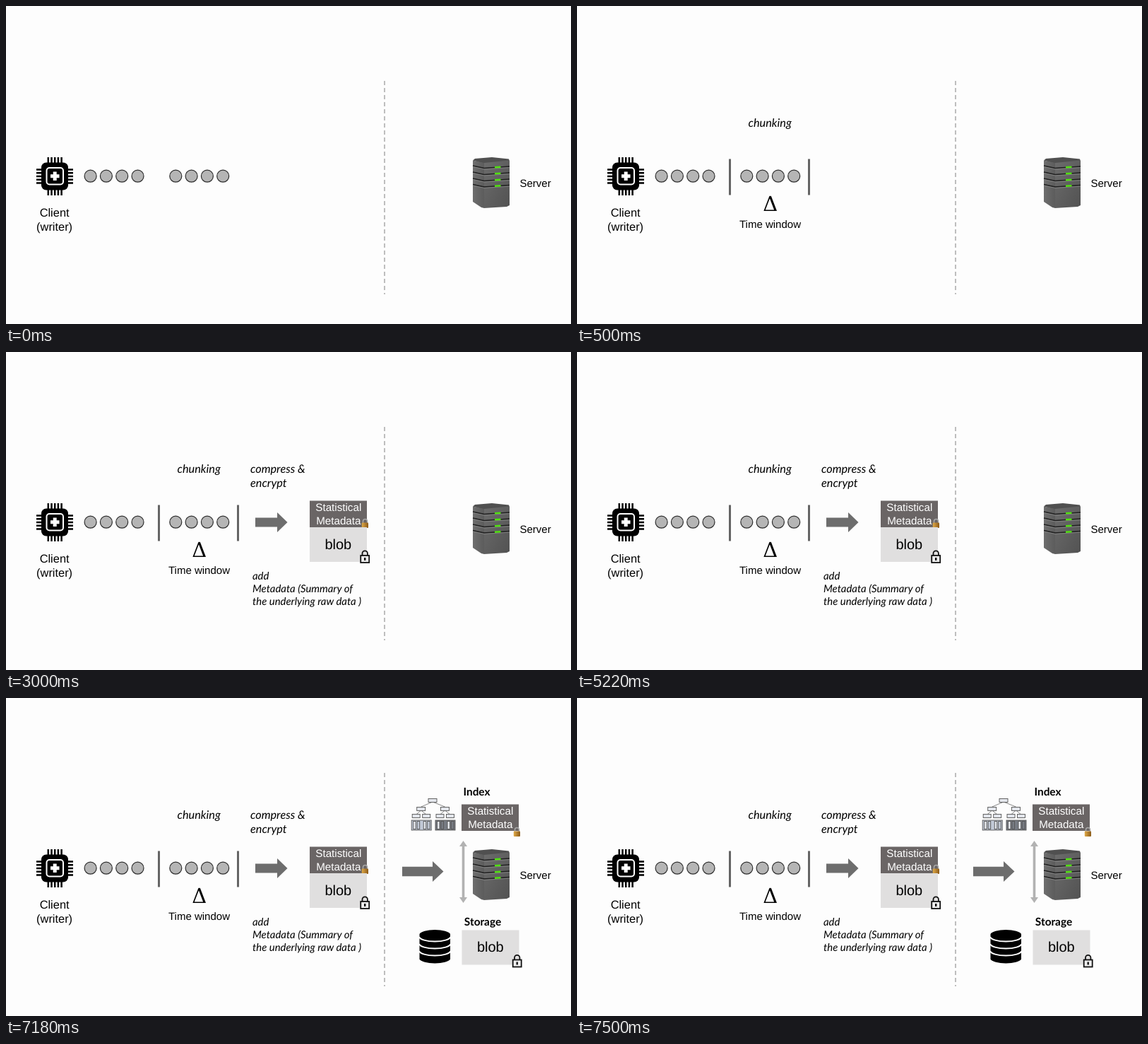
These frames come from a looping animation (800x450 px, 8000 ms). An HTML page:

```html
<!DOCTYPE html>
<html lang="en">
<head>
<meta charset="utf-8">
<title>Chunked upload pipeline</title>
<style>
  html, body { margin: 0; width: 100%; height: 100%; overflow: hidden; background: #fdfdfd; }
  svg { display: block; width: 100%; height: 100%; }
  text { font-family: "Liberation Sans", Arial, sans-serif; font-size: 15px; text-rendering: geometricPrecision; }
  .mid { text-anchor: middle; }
  .client { font-size: 16.4px; }
  .note { font: italic 16.3px Lato, sans-serif; }
  .small { font-size: 14.9px; }
  .head { font: bold 15.4px Lato, sans-serif; }
  .delta { font: 29px "DejaVu Serif", serif; }
  .blob { font-size: 20px; }
  .meta { font-size: 15.2px; fill: #fff; }
</style>
</head>
<body>
<svg viewBox="0 0 800 450">
  <defs>
    <linearGradient id="front" x1="0" y1="0" x2="1" y2="1">
      <stop offset="0" stop-color="#6c6c6c"/><stop offset="1" stop-color="#525252"/>
    </linearGradient>
    <linearGradient id="side">
      <stop offset="0" stop-color="#6e6e6e"/><stop offset="1" stop-color="#5c5c5c"/>
    </linearGradient>
    <linearGradient id="gold">
      <stop offset="0" stop-color="#e0aa48"/><stop offset="1" stop-color="#8b5a18"/>
    </linearGradient>
    <g id="metadata">
      <rect x="430" y="210.5" width="81" height="37.5" fill="#6a6565"/>
      <text class="meta mid" x="470.8" y="225.3">Statistical</text>
      <text class="meta mid" x="470.8" y="243.7">Metadata</text>
    </g>
    <g id="goldLock">
      <path d="M505.5 243V239.5a3 3 0 0 1 6 0V243" fill="none" stroke="#a9a9a9" stroke-width="1.5"/>
      <rect x="503.8" y="241.5" width="9.2" height="7.5" rx="1" fill="url(#gold)"/>
    </g>
    <g id="blob">
      <rect x="430" y="248" width="81" height="49" fill="#e0dfdf"/>
      <text class="blob mid" x="470.3" y="278.7">blob</text>
    </g>
    <g id="padlock" stroke="#111" stroke-width="1.8">
      <path d="M504.5 288V285a3.7 3.7 0 0 1 7.4 0V288" fill="none"/>
      <rect x="502.2" y="288" width="12" height="10" fill="#eee"/>
      <path d="M508.2 291v4" stroke-width="2.4"/>
    </g>
  </defs>

  <path d="M536 106V408" stroke="#b4b4b4" stroke-width="1.7" stroke-dasharray="6 4"/>

  <g id="chip">
    <rect x="50" y="221.5" width="38" height="39" rx="7"/>
    <g id="pins" stroke="#000" stroke-width="2.5"></g>
    <rect x="57.5" y="229" width="23.5" height="23.5" rx="4" fill="none" stroke="#fff" stroke-width="2"/>
    <path d="M63 240.7H75.5M69.2 234.5V247" stroke="#fff" stroke-width="5"/>
  </g>
  <text class="client mid" x="68.6" y="298.3">Client</text>
  <text class="client mid" x="68.6" y="318.3">(writer)</text>
  <g id="dots" fill="#b5b5b5" stroke="#2c2c2c" stroke-width="1.2"></g>

  <g data-from="500">
    <path d="M216.5 216.5V267.5M328.5 216.5V267.5" stroke="#656565" stroke-width="3"/>
    <text class="note mid" x="273.2" y="171">chunking</text>
    <text class="delta mid" x="273.8" y="290">Δ</text>
    <text class="mid" x="273.5" y="314.3">Time window</text>
  </g>

  <g data-from="3000">
    <text class="note" x="346" y="171">compress &amp;</text>
    <text class="note" x="346" y="190.7">encrypt</text>
    <path d="M353 234.5H384V227L398.5 241 384 255V247.5H353Z" fill="#6d6d6d"/>
    <use href="#metadata"/>
    <use href="#goldLock"/>
    <use href="#blob"/>
    <use href="#padlock"/>
    <text class="note small" x="349" y="322">add</text>
    <text class="note small" x="349" y="340">Metadata (Summary of</text>
    <text class="note small" x="349" y="357.8">the underlying raw data )</text>
  </g>

  <g data-from="6700">
    <path d="M561 238.7H604V231L619.5 245.4 604 260V252.3H561Z" fill="#6d6d6d"/>
    <path d="M647.5 202L653 210H649.3V282H653L647.5 290 642 282H645.7V210H642Z" fill="#b2b2b2"/>
    <text class="head mid" x="666.5" y="138">Index</text>
    <use href="#metadata" x="215" y="-60"/>
    <use href="#goldLock" x="215" y="-53"/>
    <g id="tree" fill="#e3e6ec" stroke="#555" stroke-width=".9"></g>
    <text class="head mid" x="675" y="322">Storage</text>
    <use href="#blob" x="215.5" y="80.5"/>
    <use href="#padlock" x="215.5" y="82.5"/>
    <path d="M585.5 334a22 7 0 0 1 43.5 0V369.5a22 7 0 0 1-43.5 0Z"/>
    <path id="gaps" fill="none" stroke="#fdfdfd" stroke-width="2"/>
  </g>

  <g id="server">
    <path d="M661 218.5L664 216 688 214 712 216.5 713 220 677 223Z" fill="#505050"/>
    <path d="M661 218.5L677 222V286L673 285 661 277Z" fill="url(#side)"/>
    <path d="M677 222L713 218.5V282L709 284 677 286Z" fill="url(#front)"/>
    <g id="bays" fill="none"></g>
  </g>
  <text x="727.5" y="256">Server</text>
</svg>
<script>
  const LOOP = 8000;
  const byId = id => document.getElementById(id);
  const fill = (id, items, draw) => { byId(id).innerHTML = items.map(draw).join(""); };
  const box = (x, y, w, h, attrs = "") =>
    `<rect x="${x}" y="${y}" width="${w}" height="${h}" ${attrs}/>`;

  fill("pins", [-2, -1, 0, 1, 2], i =>
    `<path d="M${69.2 + i * 4.7} 214V268M43 ${241 + i * 4.7}H95"/>`);

  fill("dots", [119.6, 240.3], start => [0, 1, 2, 3].map(i =>
    `<circle cx="${start + i * 22.3}" cy="240.7" r="8.5"/>`).join(""));

  fill("bays", [228, 237, 246, 254.5], y =>
    `<path d="M661 ${y - 2}L677 ${y + 1.5} 713 ${y - 1}" stroke="#202020" stroke-width="1.7"/>
     <path d="M661 ${y - .5}L677 ${y + 3} 713 ${y + .6}" stroke="#888" stroke-width=".8"/>
     <path d="M692 ${y + .3}L700.5 ${y - .2}" stroke="#50e010" stroke-width="2.6"/>`);

  byId("gaps").setAttribute("d", [338, 348, 358].map(y =>
    `M585 ${y}a22.3 7 0 0 0 44.5 0`).join(""));

  const branch = (x, y, childX, childY) =>
    `<path d="M${x} ${y}L${childX} ${childY}" stroke="#777"/>`;
  fill("tree", [[587.7, "#c2cad8"], [621.5, "#777b83"]], ([x, shade]) =>
    branch(604, 147, x, 154) +
    box(x - 13.5, 173, 28, 14, `fill="${shade}"`) +
    [-7, 7.5].map(dx => branch(x, 159, x + dx, 165) +
      box(x + dx - 5.5, 164.5, 11, 5) +
      box(x + dx - 4, 174.5, 3.5, 11) + box(x + dx + 1.5, 174.5, 3.5, 11, `fill="${shade}"`)).join("") +
    box(x - 6, 154.5, 12, 5));
  byId("tree").innerHTML += box(598, 142.5, 12, 5);

  const steps = [...document.querySelectorAll("[data-from]")];
  function frame() {
    const time = performance.now() % LOOP;
    for (const step of steps)
      step.style.visibility = time >= +step.dataset.from ? "visible" : "hidden";
    requestAnimationFrame(frame);
  }
  frame();
</script>
</body>
</html>
```
